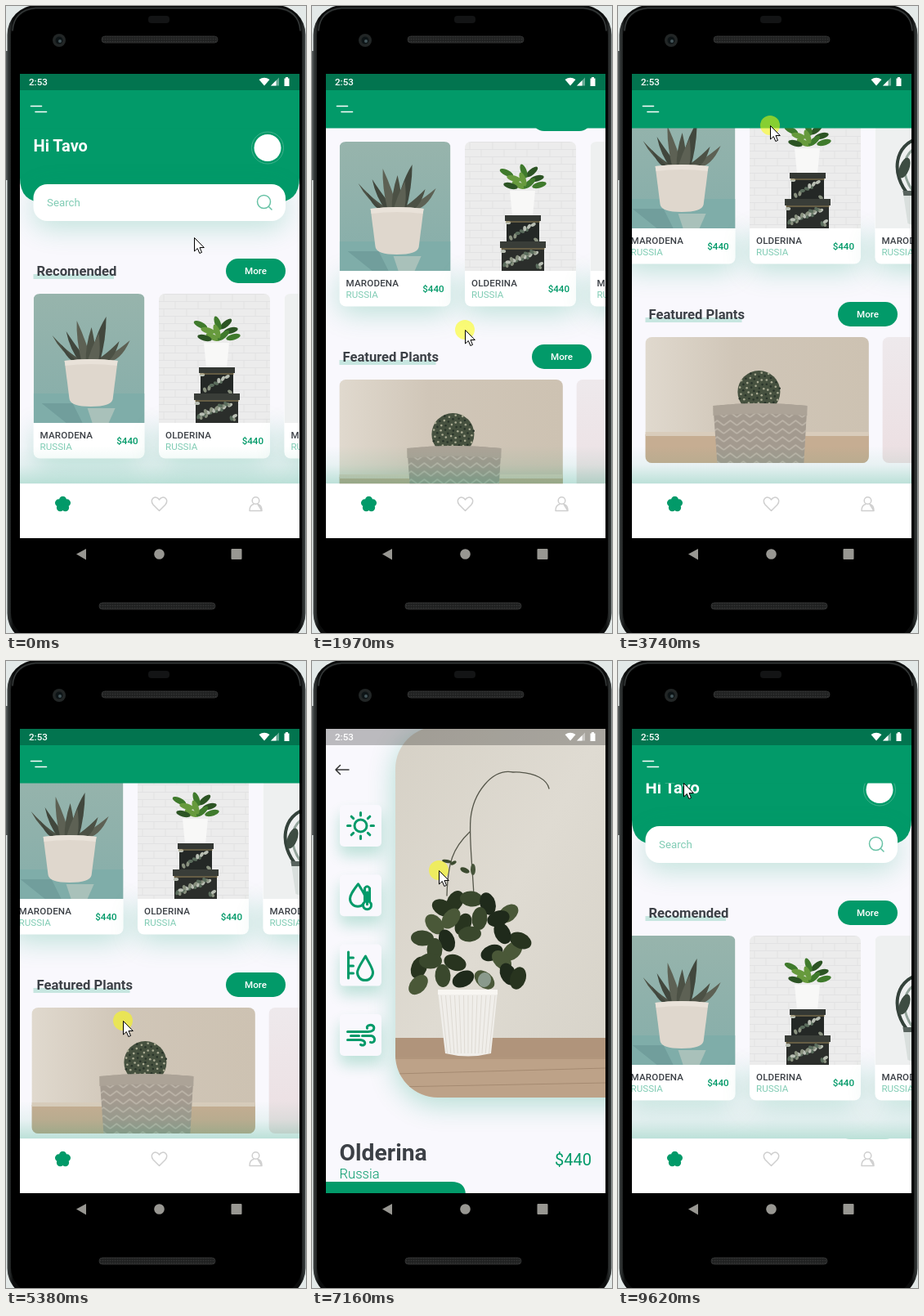
An HTML page that plays this animation: 367x767 px, repeating every 9690 ms.

```html
<!DOCTYPE html>
<html lang="en">
<head>
<meta charset="utf-8">
<title>Plant shop app</title>
<style>
  html, body { margin: 0; width: 100%; height: 100%; overflow: hidden; background: #000; }
  svg { display: block; width: 100vw; height: 100vh; font-family: Roboto, sans-serif; }
  .green { fill: #029a69; }
  .pale { fill: #029a69; fill-opacity: .5; }
  .ink { fill: #3c4046; }
  .line { fill: none; stroke-linecap: round; stroke-linejoin: round; }
  .medium { font-weight: 500; }
  .bold { font-weight: 700; }
</style>
</head>
<body>
<svg viewBox="0 0 367 767" xmlns="http://www.w3.org/2000/svg">
  <defs>
    <clipPath id="screen"><rect x="17" y="83" width="342" height="568"/></clipPath>
    <clipPath id="body"><rect x="17" y="149" width="342" height="435.5"/></clipPath>
    <clipPath id="thumb"><path d="M0 158V8Q0 0 8 0H128Q136 0 136 8V158Z"/></clipPath>
    <clipPath id="wide"><rect width="273.5" height="154" rx="8"/></clipPath>
    <clipPath id="hero"><rect x="102" y="83" width="340" height="454" rx="52"/></clipPath>
    <filter id="soft" x="-60%" y="-150%" width="220%" height="400%"><feGaussianBlur stdDeviation="17"/></filter>
    <filter id="near" x="-60%" y="-60%" width="220%" height="220%"><feGaussianBlur stdDeviation="9"/></filter>
    <linearGradient id="navShade" x2="0" y2="1">
      <stop stop-color="#029a69" stop-opacity="0"/>
      <stop offset=".5" stop-color="#029a69" stop-opacity=".07"/>
      <stop offset="1" stop-color="#029a69" stop-opacity=".25"/>
    </linearGradient>
    <linearGradient id="teal" x2="0" y2="1"><stop stop-color="#97b4ac"/><stop offset="1" stop-color="#86aeaa"/></linearGradient>
    <linearGradient id="wall" x2="1" y2="1"><stop stop-color="#d6d1c6"/><stop offset=".5" stop-color="#dfdbd2"/><stop offset="1" stop-color="#d6d2c8"/></linearGradient>
    <linearGradient id="sand"><stop stop-color="#e0d9ce"/><stop offset=".4" stop-color="#d0c6b8"/><stop offset="1" stop-color="#cdc2b2"/></linearGradient>
    <linearGradient id="rose" x2="0" y2="1"><stop stop-color="#eee9ec"/><stop offset="1" stop-color="#ecdfe2"/></linearGradient>
    <linearGradient id="edge" x2="1"><stop stop-color="#3d4242"/><stop offset=".02" stop-color="#0b0c0c"/><stop offset=".98" stop-color="#0b0c0c"/><stop offset="1" stop-color="#3d4242"/></linearGradient>
    <pattern id="brick" width="28" height="18" patternUnits="userSpaceOnUse">
      <rect width="28" height="18" fill="#ececec"/>
      <path d="M0 .5H28M0 9.5H28M6 0V9M20 9V18" stroke="#e2e2e3" fill="none"/>
    </pattern>
    <pattern id="weave" width="16" height="10" patternUnits="userSpaceOnUse">
      <rect width="16" height="10" fill="#a39a8f"/>
      <path d="M0 8L8 2L16 8" stroke="#bdb5a9" stroke-width="1.6" fill="none"/>
    </pattern>
    <pattern id="dots" width="3" height="3" patternUnits="userSpaceOnUse">
      <rect width="3" height="3" fill="#202121"/><circle cx="1.5" cy="1.5" r=".8" fill="#353636"/>
    </pattern>
  </defs>

  <!-- phone -->
  <rect width="367" height="767" fill="#e3e9e8"/>
  <rect x="0" y="55" width="4" height="158" fill="#555a5a"/>
  <rect x="1.5" y="-1" width="365" height="780" rx="36" fill="url(#edge)"/>
  <rect x="6" y="4" width="356" height="770" rx="32" fill="#000"/>
  <path class="line" d="M8 30Q10 5 36 2.5H332Q358 5 360 30" stroke="#343838" stroke-width="1.6"/>
  <rect x="174" y="12" width="26" height="9" rx="4" fill="#131415"/>
  <circle cx="65" cy="42" r="8" fill="#222626"/><circle cx="65" cy="42" r="4.5" fill="#0d1416"/><circle cx="66" cy="43" r="2" fill="#44565b"/>
  <rect x="117" y="37" width="142" height="8" rx="4" fill="url(#dots)" stroke="#303131"/>
  <rect x="114" y="730" width="142" height="8" rx="4" fill="url(#dots)" stroke="#303131"/>
  <g fill="#989792"><path d="M86 670.5L98 664V677.5Z"/><circle cx="187.500" cy="670.500" r="6.300"/><rect x="275.500" y="664" width="13" height="13" rx="1"/></g>

  <g clip-path="url(#screen)">
    <rect x="17" y="83" width="342" height="568" fill="#f9f8fd"/>
    <g clip-path="url(#body)">
      <g id="page">
        <path class="green" d="M17 100H359V210Q359 240.500 329 240.500H47Q17 240.500 17 210Z"/>
        <text class="bold" x="33.500" y="178" font-size="20" fill="#fff">Hi Tavo</text>
        <circle cx="320" cy="173.500" r="19.500" fill="none" stroke="#3fb18b"/>
        <circle cx="320" cy="173.500" r="16.500" fill="#fff"/>
        <rect class="green" x="33.500" y="226" width="308.500" height="45" rx="17" opacity=".23" filter="url(#soft)"/>
        <rect x="33.500" y="218" width="308.500" height="45" rx="17" fill="#fff"/>
        <text class="pale" x="50" y="245" font-size="13.300">Search</text>
        <path class="line" d="M307.500 239.500a8 8 0 1 0 16 0a8 8 0 1 0 -16 0M321.500 245.500L325 249" stroke="#029a69" stroke-opacity=".6" stroke-width="1.500"/>
        <g id="titles"></g>
        <g id="cards"></g>
        <g id="featured"></g>
      </g>
      <rect x="17" y="538" width="342" height="46.500" fill="url(#navShade)"/>
    </g>
    <rect class="green" x="17" y="83" width="342" height="66.500"/>
    <path class="line" d="M30.500 122.500H43.500M36 129.500H49.500" stroke="#fff" stroke-width="1.600"/>
    <rect x="17" y="584.500" width="342" height="67" fill="#fff"/>
    <g id="flower" class="green"></g>
    <g class="line" stroke="#cfcfcf" stroke-width="1.500">
      <path d="M187.500 617.500L180 610C174.500 603 183.500 597.500 187.500 604C191.500 597.500 200.500 603 195 610Z"/>
      <circle cx="305.500" cy="605" r="4.300"/><path d="M298 617.500Q298 610.500 303 609.500M308 609.500Q313 610.500 313 617.500Z M298 617.500H313"/>
    </g>

    <g id="detail">
      <rect x="17" y="83" width="342" height="568" fill="#f9f8fd"/>
      <g id="detailPage">
        <rect class="green" x="102" y="91" width="340" height="454" rx="52" opacity=".29" filter="url(#soft)"/>
        <g id="heroPhoto" clip-path="url(#hero)"></g>
        <path class="line" d="M45 136H29M34.500 130.500L29 136L34.500 141.500" stroke="#333" stroke-width="1.500"/>
        <g id="tiles"></g>
        <text class="bold ink" x="33.500" y="613.500" font-size="28.300">Olderina</text>
        <text class="green" x="33.500" y="636" font-size="16.600" font-weight="300">Russia</text>
        <text class="green" x="342" y="619.500" font-size="20" text-anchor="end">$440</text>
        <path class="green" d="M17 640H171Q188 640 188 657V710H17Z"/>
      </g>
    </g>

    <rect x="17" y="83" width="342" height="20" opacity=".25"/>
    <g fill="#fff">
      <text class="medium" x="28" y="97" font-size="11.600">2:53</text>
      <path d="M309.500 90Q316 85.500 322.500 90L316 97.500Z"/>
      <path d="M334 87.500V97.500H324Z" opacity=".4"/><path d="M330.500 91V97.500H324Z"/>
      <path d="M340.500 88.500H342V87H345V88.500H346.500V98H340.500Z"/>
    </g>
  </g>

  <circle id="press" r="12" fill="#ff0" fill-opacity=".53"/>
  <path id="cursor" d="M0 0V16.500L3.800 13L6.300 19L9 17.900L6.500 12H11.800Z" fill="#fff" stroke="#000"/>
</svg>

<script>
const LOOP = 9690;
const el = id => document.getElementById(id);
const range = n => [...Array(n).keys()];
const move = (node, x, y) => node.setAttribute('transform', `translate(${x} ${y})`);

// ---------- artwork ----------
const oval = (x, y, rx, ry, turn, fill) =>
  `<ellipse cx="${x}" cy="${y}" rx="${rx}" ry="${ry}" fill="${fill}" transform="rotate(${turn} ${x} ${y})"/>`;

const spike = (x, tx, ty, fill) =>
  `<path d="M${x - 6} 84Q${(x + tx) / 2 - 7} ${ty + 22} ${tx} ${ty}Q${(x + tx) / 2 + 7} ${ty + 28} ${x + 6} 84Z" fill="${fill}"/>`;

const succulent = `<rect width="136" height="158" fill="url(#teal)"/>
  <rect y="122" width="136" height="36" fill="#7fada9"/>
  <path d="M10 134H48L60 158H40Z" fill="#719e9c"/><path d="M66 140H100L92 158H72Z" fill="#a9c1ba"/>
  ${[[60, 23, 51], [80, 118, 57], [63, 40, 46], [76, 105, 58], [65, 53, 33], [75, 89, 28], [70, 71, 41], [72, 80, 48], [62, 34, 62]]
    .map(([x, tx, ty], i) => spike(x, tx, ty, ['#4c5145', '#5d6154', '#41473d'][i % 3])).join('')}
  <path d="M38 82Q70 78 103 82L97 129Q95 138 70 138Q46 138 44 129Z" fill="#dfd7cd"/>
  <path d="M38 82Q70 78 103 82L102 88Q70 84 39 88Z" fill="#e9e2d9"/>`;

const blooms = (x, y, w, h, n) => range(n).map(i =>
  oval(x + (i * 0.618 % 1) * w, y + (i * 0.37 % 1) * h, 3.2, 2, i * 50, ['#b9bfb4', '#5b6d5d', '#89917f'][i % 3])).join('');

const boxes = `<rect width="136" height="158" fill="url(#brick)"/>
  ${[[51, 38], [82, 37], [60, 45], [72, 36], [88, 45], [66, 53], [79, 51], [56, 54], [71, 46], [91, 53]]
    .map(([x, y], i) => oval(x, y, 9, 3.6, [25, -40, 15, 70, -15][i % 5], ['#3f7a2c', '#2c5424', '#679a3d'][i % 3])).join('')}
  <path d="M55 60H86L83 91H58Z" fill="#f8f8f7"/>
  <rect x="51" y="91" width="40" height="32" fill="#242826"/>${blooms(53, 99, 36, 22, 10)}
  <rect x="49" y="90" width="44" height="7" fill="#343834"/><path d="M50 98H92" stroke="#a18d5f"/>
  <rect x="45" y="123" width="52" height="35" fill="#2b2e2b"/>${blooms(47, 134, 47, 20, 24)}
  <rect x="43" y="122" width="56" height="8" fill="#393d38"/><path d="M44 131H98" stroke="#a18d5f"/>`;

const arch = `<rect width="136" height="158" fill="#eef0f0"/>
  <path class="line" d="M42 118C18 92 24 54 54 48S92 76 82 112" stroke="#34423b" stroke-width="4"/>
  <path class="line" d="M46 112C32 92 32 68 52 58" stroke="#93a49b" stroke-width="3"/>
  ${oval(36, 84, 6, 13, 20, '#3d4c42')}${oval(62, 92, 8, 17, -20, '#42574a')}
  <path d="M34 112H92L86 152Q62 160 40 152Z" fill="#d9dfdd"/>
  <path d="M34 112H92L91 118H35Z" fill="#58635e"/>`;

const cactus = `<rect width="273.5" height="154" fill="url(#sand)"/>
  <rect y="119" width="273.5" height="35" fill="#c6ad92"/><rect y="116" width="273.5" height="5" fill="#d9ccbb"/>
  <circle cx="139" cy="67" r="26" fill="#46513f"/>
  ${range(70).map(i => {
    const r = 26 * Math.sqrt(i / 70), a = i * 2.4;
    return `<circle cx="${(139 + r * Math.cos(a)).toFixed(1)}" cy="${(67 + r * Math.sin(a)).toFixed(1)}" r="1.300" fill="${i % 2 ? '#a9aa92' : '#29342a'}"/>`;
  }).join('')}
  <path d="M83 84Q139 78 198 84L194 154H88Z" fill="url(#weave)"/>
  <path d="M83 84Q139 78 198 84V96Q139 91 83 96Z" fill="#aca397"/>`;

const leafSpots = [
  [175, 297], [195, 294], [215, 300], [240, 312], [160, 305], [205, 318], [228, 318], [150, 325], [185, 325],
  [135, 342], [165, 345], [245, 358], [255, 345], [150, 356], [220, 360], [232, 369], [131, 378], [145, 370],
  [240, 386], [130, 399], [175, 372], [160, 388], [185, 392], [211, 393], [252, 391], [193, 337], [233, 336], [170, 318]];
const hero = `<rect x="102" y="83" width="257" height="454" fill="url(#wall)"/>
  <rect x="102" y="464" width="257" height="73" fill="#bda288"/>
  <rect x="102" y="464" width="257" height="24" fill="#b0947b"/>
  <path d="M102 489H359M102 508L359 501M102 524L359 519" stroke="#a58a71" fill="none"/>
  <path class="line" d="M198 290C196 250 192 220 194 196C197 165 220 134 246 139C275 138 288 150 290 159M165 290C166 250 172 232 193 212" stroke="#55564a" stroke-width="1.300"/>
  ${oval(187, 259, 6, 3, 25, '#3b4a2f')}${oval(165, 248, 6, 2, 10, '#3b4a2f')}${oval(173, 250, 4, 2, -30, '#3b4a2f')}${oval(197, 258, 3, 7, 0, '#46543a')}
  ${leafSpots.map(([x, y], i) => oval(x, y, 14, 9.5, (i * 67) % 180 - 60, ['#28341f', '#3a482d', '#1f2a1b', '#4a5838'][i % 4])).join('')}
  ${oval(211, 393, 8, 9, 20, '#8a9a8c')}
  <path d="M154 407H227L219 483Q191 490 163 483Z" fill="#f0eeea"/>
  <path d="${range(13).map(i => `M${158 + i * 5.5} 412L${165.500 + i * 4.250} 483`).join('')}" stroke="#dfdbd4" fill="none"/>
  <path d="M154 405H227V411H154Z" fill="#f8f6f2"/>`;

// ---------- page parts ----------
const title = (label, y, width) => `
  <rect class="green" x="33.500" y="${y - 2}" width="${width}" height="6" opacity=".2"/>
  <text class="bold ink" x="37.500" y="${y}" font-size="16.600">${label}</text>
  <rect class="green" x="269" y="${y - 21}" width="73" height="30" rx="15"/>
  <text class="medium" x="305.500" y="${y - 2}" font-size="11.600" fill="#fff" text-anchor="middle">More</text>`;

const card = ([name, art], i) => `<g transform="translate(${33.6 + 153.4 * i} 352)" font-size="11.600">
  <rect class="green" y="166" width="136" height="43" rx="8" opacity=".25" filter="url(#soft)"/>
  <rect width="136" height="201.500" rx="8" fill="#fff"/>
  <g clip-path="url(#thumb)">${art}</g>
  <text class="medium ink" x="8" y="177" letter-spacing=".15">${name}</text>
  <text class="pale" x="8" y="191">RUSSIA</text>
  <text class="green medium" x="128" y="184" text-anchor="end">$440</text></g>`;

const wide = (art, i) => `<g transform="translate(${33.4 + 290 * i} 643)" clip-path="url(#wide)">${art}</g>`;

const drop = 'C-6 -3 -10 2 -10 7A9.500 9.500 0 0 0 9 7C9 2 5 -3 0 -11Z';
const icons = [
  `<circle r="7.500"/><path d="${range(8).map(i => {
    const c = Math.cos(i * Math.PI / 4), s = Math.sin(i * Math.PI / 4);
    return `M${12.500 * c} ${12.500 * s}L${16 * c} ${16 * s}`;
  }).join('')}"/>`,
  `<path transform="translate(-3 -3)" d="M0 -11${drop}"/><path d="M5 8V-9Q8 -13 11 -9V8A5 5 0 1 1 5 8Z" fill="#f9f8fd"/><path d="M8 -4V11"/>`,
  `<path d="M-15 -16V16M-15 -9H-9M-15 1H-9M-15 10H-9"/><path transform="translate(6 2)" d="M0 -13${drop.replace('0 -11Z', '0 -13Z')}"/>`,
  `<path d="M-16 -4H9C19 -4 18 -13 11 -12Q7 -11 8 -8M-12 1H-2M2 1H13C19 2 18 11 12 9M-16 6H0C8 7 6 15 0 12"/>`];
const tile = (icon, i) => {
  const y = 179 + 85.3 * i;
  return `<rect class="green" x="34" y="${y + 11}" width="51" height="51" rx="5" opacity=".24" filter="url(#near)"/>
    <rect x="34" y="${y}" width="51" height="51" rx="5" fill="#f9f8fd"/>
    <g class="line" stroke="#029a69" stroke-width="3" transform="translate(59.500 ${y + 25.5})">${icon}</g>`;
};

el('titles').innerHTML = title('Recomended', 330, 98.5) + title('Featured Plants', 621, 118);
el('cards').innerHTML = [['MARODENA', succulent], ['OLDERINA', boxes], ['MARODENA', arch]].map(card).join('');
el('featured').innerHTML = [cactus, '<rect width="273.5" height="154" fill="url(#rose)"/>'].map(wide).join('');
el('heroPhoto').innerHTML = hero;
el('tiles').innerHTML = icons.map(tile).join('');
el('flower').innerHTML = '<circle cx="69.500" cy="609.500" r="6"/>' + range(5).map(i => {
  const a = (i * 72 - 90) * Math.PI / 180;
  return `<circle cx="${69.5 + 5.300 * Math.cos(a)}" cy="${609.5 + 5.300 * Math.sin(a)}" r="4.500"/>`;
}).join('');

// ---------- motion ----------
const scrollKeys = [[640, 0], [1130, 150], [1360, 238], [1890, 238], [1970, 186], [2150, 80], [2510, 0], [3590, 0],
  [3740, 238], [5300, 238], [5380, 219], [5620, 110], [5800, 50], [6070, 16]];
const cardKeys = [[2750, 0], [2980, 118], [3200, 118], [3520, 26]];
const featuredKeys = [[4250, 0], [4520, 112], [4830, 112], [4990, 2]];
const detailKeys = [[7080, 0], [7160, 3], [7300, 40], [7450, 40], [7600, 59], [7900, 59], [8380, 0]];
const openKeys = [[6230, 0], [6530, 1], [9080, 1], [9390, 0]];
const cursorKeys = [[210, 230, 283], [600, 190, 480], [700, 190, 480], [1130, 190, 120], [1360, 188, 34], [1590, 188, 31],
  [1820, 187, 325], [1890, 187, 345], [1970, 187, 396], [2150, 187, 520], [2510, 200, 480], [2750, 240, 450],
  [2980, 14, 440], [3200, 14, 440], [3520, 130, 440], [3590, 187, 430], [3740, 186, 146], [3820, 187, 109],
  [4200, 146, 480], [4520, 14, 470], [4830, 14, 470], [4990, 144, 430], [5300, 143, 418], [5380, 143, 440],
  [5620, 140, 545], [6070, 69, 523], [6840, 69, 523], [7070, 155, 280], [7160, 155, 256], [7300, 155, 200],
  [7700, 140, 180], [8380, 125, 247], [8910, 38, 130], [9080, 38, 137], [9545, 38, 137], [9620, 80, 149]];
const presses = [[680, 1360], [1860, 2200], [2740, 3000], [3200, 3520], [3590, 3900], [4250, 4520], [4830, 5000],
  [5200, 5620], [6070, 6150], [7100, 7320], [7700, 8300], [8840, 8990]];
const holds = [[1970, 2050], [3740, 3820], [5380, 5450], [7160, 7220], [9080, 9160]];

function track(keys, t, channel = 1) {
  const next = keys.findIndex(k => k[0] > t);
  if (next === 0) return keys[0][channel];
  if (next < 0) return keys[keys.length - 1][channel];
  const a = keys[next - 1], b = keys[next];
  return a[channel] + (b[channel] - a[channel]) * (t - a[0]) / (b[0] - a[0]);
}
const spanAt = (spans, t) => spans.find(([from, to]) => t >= from && t < to);

function render(time) {
  const hold = spanAt(holds, time);
  const t = hold ? hold[0] : time;
  move(el('page'), 0, -track(scrollKeys, t));
  move(el('cards'), -track(cardKeys, t), 0);
  move(el('featured'), -track(featuredKeys, t), 0);
  move(el('detailPage'), 0, -track(detailKeys, t));

  const open = track(openKeys, t);
  move(el('detail'), 0, 142 * (1 - open) ** 3);
  el('detail').setAttribute('opacity', open ** 1.6);
  el('detail').setAttribute('display', open ? 'inline' : 'none');

  const x = track(cursorKeys, t, 1), y = track(cursorKeys, t, 2);
  move(el('cursor'), x + .5, y + .5);
  move(el('press'), x, y);
  el('press').setAttribute('display', spanAt(presses, t) ? 'inline' : 'none');
}

const start = performance.now();
function tick() {
  render((performance.now() - start) % LOOP);
  requestAnimationFrame(tick);
}
tick();
</script>
</body>
</html>
```
